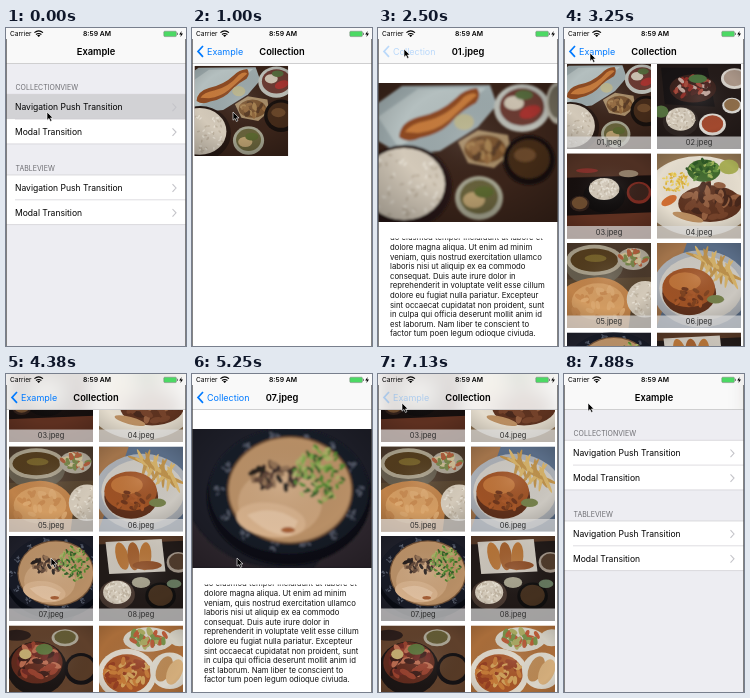
Write an HTML page that moves like this. It is 180 by 318 pixels and loops after 8 s.

```html
<!DOCTYPE html>
<html lang="en">
<head>
<meta charset="utf-8">
<title>Photo transition demo</title>
<style>
  html, body { margin: 0; width: 100%; height: 100%; overflow: hidden; background: #fff; }
  svg { display: block; }
  #stage { width: 100vw; height: 100vh; }
  text { font-family: Inter, Roboto, "Liberation Sans", sans-serif; }
  .title { font-size: 9.3px; font-weight: 600; text-anchor: middle; }
  .back { font-size: 9px; fill: #007aff; }
  .row { font-size: 8.55px; }
  .head { font-size: 7px; fill: #6d6d72; }
  .label { font-size: 7.4px; text-anchor: middle; fill: #2c2c2c; }
  .body { font-size: 7.75px; fill: #111; }
</style>
</head>
<body>
<svg id="stage" viewBox="0 0 180 318">
  <defs id="defs">
    <clipPath id="textClip"><rect y="210.5" width="180" height="108"/></clipPath>
    <clipPath id="barClip"><rect width="180" height="36"/></clipPath>
    <filter id="soft"><feGaussianBlur stdDeviation=".9"/></filter>
    <filter id="frost"><feGaussianBlur stdDeviation="9"/></filter>
    <radialGradient id="light" cx=".5" cy=".4" r=".75">
      <stop offset="0" stop-color="#fff" stop-opacity=".1"/>
      <stop offset=".5" stop-color="#000" stop-opacity="0"/>
      <stop offset="1" stop-color="#000" stop-opacity=".28"/>
    </radialGradient>
  </defs>
  <rect width="180" height="318" fill="#fff"/>
  <g id="list"></g>
  <g id="collection"><rect width="180" height="318" fill="#fff"/><g id="grid"></g></g>
  <use id="hero"/>
  <g id="article" clip-path="url(#textClip)"></g>
  <g id="nav">
    <g clip-path="url(#barClip)">
      <rect width="180" height="36" fill="#fff"/>
      <g id="frosted"><use href="#grid" filter="url(#frost)"/></g>
    </g>
    <rect width="180" height="36" fill="#f8f8f8" opacity=".85"/>
    <rect y="35.4" width="180" height=".6" fill="#b4b4b6"/>
    <text x="4" y="8.2" font-size="6.6">Carrier</text>
    <g fill="none" stroke="#000" stroke-width="1.1">
      <path d="M28.4 4.6Q32.7 1.2 37 4.6M30 6.5Q32.7 4.4 35.4 6.5"/>
    </g>
    <path d="M31.1 7.4Q32.7 6.3 34.3 7.4L32.7 9Z"/>
    <text x="91" y="8.2" font-size="6.8" font-weight="600" text-anchor="middle">8:59 AM</text>
    <rect x="157.8" y="3.2" width="12.6" height="5.4" rx="1" fill="#4cd964" stroke="#7a7a7a" stroke-width=".5"/>
    <rect x="171" y="4.8" width=".9" height="2.2" fill="#777"/>
    <path d="M175.6 3L173.2 6.4H174.9L174.5 9L177 5.4H175.2Z"/>
    <path id="chevron" d="M11 18L6 23.4L11 28.8" fill="none" stroke="#007aff" stroke-width="1.7"/>
    <g id="items"></g>
  </g>
  <path id="cursor" d="M0 0V8.2L2 6.5L3.4 9.5L4.9 8.8L3.5 5.9H6Z" stroke="#fff" stroke-width=".6"/>
  <path d="M.4 11V318M179.6 11V318" stroke="#555" stroke-width=".8"/>
</svg>
<script>
const LOOP = 8000, CELL_W = 84, CELL_H = 85, PITCH = 89.5, SCROLL = 142.5;
const $ = id => document.getElementById(id);

// Drawing helpers for the dishes
let seed = 7;
const random = () => (seed = seed * 16807 % 2147483647) / 2147483647;
const oval = (x, y, rx, ry, fill, turn = 0) =>
  `<ellipse cx="${x}" cy="${y}" rx="${rx}" ry="${ry}" fill="${fill}" transform="rotate(${turn} ${x} ${y})"/>`;
const shape = (d, fill) => `<path d="${d}" fill="${fill}"/>`;
const bowl = (x, y, rx, ry, rim, food) => oval(x, y, rx, ry, rim) + oval(x, y - 1, rx * .8, ry * .78, food);
const scatter = (n, x, y, rx, ry, size, colors) => {
  let out = '';
  for (let i = 0; i < n; i++) {
    const a = random() * 6.283, r = Math.sqrt(random());
    out += oval((x + Math.cos(a) * r * rx).toFixed(1), (y + Math.sin(a) * r * ry).toFixed(1),
      size, size * .5, colors[i % colors.length], Math.round(random() * 180));
  }
  return out;
};
const rice = (x, y, rx, ry) => oval(x, y, rx, ry, '#d3c9b9') + scatter(60, x, y, rx * .95, ry * .92, 2.5, ['#e6dfd2', '#bfb3a1']);

const dishes = [
  ['#3a241a',
    shape('M0 20L24 3L112 2L119 22L100 44L62 68L24 72L0 58Z', '#9ba8aa'),
    shape('M0 34L40 6L108 5L70 38L20 64Z', '#b4bfbf'),
    shape('M21 54Q22 39 40 34Q62 30 78 15Q86 6 99 5Q104 12 98 20Q86 26 76 36Q64 51 42 55Q30 61 21 54Z', '#8d4a22'),
    shape('M27 49Q32 41 48 38Q70 33 86 14Q95 8 99 12Q86 23 71 37Q58 48 40 50Z', '#c67a3b'),
    oval(86, 39, 10, 8, '#b9b48c'), bowl(144, 25, 28, 24, '#b9bbb4', '#6a3a32'),
    oval(136, 20, 10, 7, '#c9bfae'), oval(152, 29, 11, 6, '#a3332f', -20), oval(146, 12, 9, 5, '#566b3d'),
    bowl(180, 20, 12, 21, '#b5b1a3', '#6f6a5a'),
    shape('M80 59L100 47L130 52L133 70L116 85L90 80Z', '#a68b66'), oval(107, 66, 21, 14, '#76502c'),
    scatter(22, 107, 66, 18, 11, 5, ['#91663a', '#a37d4b', '#553720']),
    oval(27, 104, 47, 42, '#261813'), rice(26, 101, 41, 36),
    bowl(151, 77, 26, 25, '#17100d', '#432a19'), oval(147, 72, 11, 7, '#684629'),
    bowl(101, 115, 24, 22, '#a2a18d', '#66613a'), oval(96, 117, 11, 8, '#b69c6d'), oval(106, 109, 10, 6, '#59652f')],
  ['#241b19',
    oval(62, 24, 30, 16, '#453a33'), shape('M28 6H104L116 70L34 66Z', '#171314'), oval(80, 40, 38, 23, '#3a211c'),
    scatter(36, 80, 38, 31, 17, 6, ['#8e2b24', '#a4493a', '#4b2420', '#c0a49a']), oval(88, 24, 15, 7, '#4a713d'),
    bowl(148, 24, 22, 17, '#d6d1ca', '#a99587'), bowl(144, 68, 16, 13, '#d5d3ce', '#8d6d49'),
    oval(60, 94, 29, 24, '#302724'), rice(60, 90, 24, 19), bowl(112, 99, 22, 18, '#ddd9d2', '#a2492e'), oval(28, 78, 12, 10, '#54703e')],
  ['#38201a',
    shape('M0 0H180V34L0 40Z', '#4f3023'), shape('M18 40L160 36L170 104L12 110Z', '#160f0e'),
    shape('M16 102L164 96L170 139H8Z', '#5e3020'), oval(82, 70, 34, 27, '#0f0c0c'), rice(82, 58, 25, 18),
    bowl(139, 64, 20, 18, '#7a2a20', '#38211a'), bowl(42, 82, 16, 13, '#30201a', '#6b4b2e'),
    oval(122, 33, 16, 6, '#93806a'), oval(54, 28, 18, 4, '#84302a')],
  ['#8f7352',
    oval(91, 70, 91, 66, '#e4dccd'), oval(108, 82, 52, 30, '#5d321f'),
    scatter(34, 111, 76, 45, 28, 10, ['#74422a', '#47271b', '#945f40']), oval(98, 28, 27, 18, '#3f682b'),
    scatter(26, 98, 27, 26, 17, 5, ['#64913f', '#2d5725', '#a0b45c']), scatter(55, 52, 47, 22, 17, 3, ['#dcb13b', '#ecd063']),
    oval(41, 77, 14, 7, '#cf6d31', -30), oval(139, 22, 16, 12, '#a8ad55'), oval(72, 104, 26, 6, '#b98d60', 15)],
  ['#57442f',
    shape('M0 0H180V55L0 60Z', '#49382a'), oval(66, 38, 47, 31, '#635b4c'), oval(66, 28, 46, 25, '#a69d88'), oval(66, 28, 39, 19, '#513b1d'),
    oval(68, 25, 18, 6, '#75612a'), oval(130, 26, 26, 18, '#a9a294'), scatter(30, 130, 24, 21, 13, 6, ['#76854a', '#a95a3a', '#c9b992']),
    shape('M8 139V84Q28 58 72 56Q112 58 128 91L122 139Z', '#bf8249'), oval(72, 96, 43, 30, '#d39c62'),
    scatter(24, 74, 102, 45, 28, 7, ['#c78a51', '#daa76f']), rice(149, 92, 30, 30)],
  ['#596c86',
    shape('M0 0H70L20 139H0Z', '#a2744b'), oval(93, 75, 79, 63, '#a9adb3'), oval(93, 74, 68, 53, '#cbc7c0'),
    Array.from({ length: 16 }, (_, i) => oval(91 + i * 3.5, 24 + i * 37 % 35, 24, 3, i % 2 ? '#d4b169' : '#bd914b', 20 + i * 43 % 120)).join(''),
    oval(74, 82, 44, 36, '#5e301b'), oval(73, 73, 43, 32, '#9e5225'), oval(67, 63, 26, 15, '#bd7238'),
    scatter(18, 76, 88, 34, 16, 6, ['#6c351c', '#a65729', '#7e421f']), oval(117, 92, 14, 7, '#75804b')],
  ['#1e1f29',
    shape('M0 91Q30 140 92 139H0ZM174 72L180 70V139H122Z', '#302a30'), oval(97, 68, 82, 68, '#090c14'), oval(97, 62, 80, 63, '#171a25'),
    Array.from({ length: 14 }, (_, i) => {
      const a = i * .449;
      return scatter(7, 97 + 70 * Math.cos(a), 62 + 55 * Math.sin(a), 5, 5, 2.2, ['#565c6a', '#424857']);
    }).join(''),
    oval(98, 61, 63, 54, '#705036'), oval(98, 61, 61, 52, '#b88f66'), oval(88, 74, 42, 34, '#c8a17a'),
    oval(79, 91, 35, 17, '#d4af8a', 8), shape('M55 86Q81 74 106 92L99 106Q77 108 55 86Z', '#dfbf9f'), oval(96, 101, 7, 3, '#a45e36'),
    scatter(40, 84, 47, 24, 13, 5, ['#221a18', '#5b4030', '#362620', '#8f6d50']),
    scatter(110, 127, 46, 25, 29, 3, ['#4f852e', '#7ea64b', '#316026', '#a6b065'])],
  ['#553826',
    shape('M18 14L180 7V139H10Z', '#211a18'), shape('M32 10L124 5L130 58L38 62Z', '#c9c3b9'),
    [0, 1, 2].map(i => oval(59 + i * 19, 33, 10, 23, i % 2 ? '#9f5e2e' : '#b37338', -15 + i * 9)).join(''),
    oval(100, 48, 24, 7, '#8b4c25'), bowl(151, 43, 19, 17, '#9d9185', '#4e3a2b'), oval(51, 96, 29, 24, '#4a3a32'), rice(51, 92, 23, 19),
    bowl(122, 98, 25, 22, '#100f0f', '#44301f'), oval(90, 76, 15, 9, '#a5a18c'), oval(144, 78, 12, 7, '#64765d')],
  ['#5f402b',
    oval(67, 70, 49, 44, '#1b1514'), oval(67, 61, 42, 34, '#5f2a1d'),
    scatter(38, 66, 59, 35, 27, 9, ['#96402d', '#b86a4e', '#6d2923', '#3d1d18']), oval(79, 39, 14, 9, '#5a7239'), oval(48, 47, 10, 8, '#c3ac70'),
    bowl(139, 71, 27, 26, '#151214', '#563a26'), bowl(113, 20, 22, 14, '#aaa494', '#625a34'), oval(34, 16, 23, 9, '#2a1d1a')],
  ['#a96d3a',
    oval(102, 23, 41, 20, '#d2cec2'), scatter(36, 101, 21, 31, 13, 7, ['#76904a', '#a8a862', '#b75a38']),
    oval(67, 80, 48, 42, '#dcd5c8'), oval(67, 79, 39, 32, '#a65528'),
    scatter(44, 67, 78, 34, 27, 7, ['#c47a38', '#933e22', '#cfa05a']), oval(137, 74, 32, 30, '#dad5c9'),
    oval(128, 71, 12, 22, '#b98854', 24), oval(145, 76, 12, 22, '#d3ad7b', 24), oval(153, 20, 18, 14, '#d0ccc0')]
];
const dishName = i => `${String(i + 1).padStart(2, '0')}.jpeg`;
const cellAt = i => ({ x: 3 + i % 2 * 90, y: 36 + (i >> 1) * PITCH });

$('defs').innerHTML += dishes.map(([ground, ...parts], i) =>
  `<symbol id="dish${i}" viewBox="0 0 180 139" preserveAspectRatio="xMidYMid slice">
    <rect width="180" height="139" fill="${ground}"/><g filter="url(#soft)">${parts.join('')}</g>
    <rect width="180" height="139" fill="url(#light)"/></symbol>`).join('');

$('grid').innerHTML = dishes.map((_, i) => {
  const { x, y } = cellAt(i);
  return `<use href="#dish${i}" x="${x}" y="${y}" width="${CELL_W}" height="${CELL_H}"/>
    <rect x="${x}" y="${y + 72.5}" width="${CELL_W}" height="12.5" fill="#dcdcdc" opacity=".7"/>
    <text class="label" x="${x + CELL_W / 2}" y="${y + 81.4}">${dishName(i)}</text>`;
}).join('');

const section = (name, y) => `<text class="head" x="9.5" y="${y - 4.5}">${name}</text>
  <rect y="${y}" width="180" height="49.6" fill="#fff"/>` +
  ['Navigation Push Transition', 'Modal Transition'].map((label, i) => {
    const top = y + i * 24.8;
    return `${name[0] === 'C' && !i ? `<rect id="pressed" y="${top}" width="180" height="24.8" fill="#d2d2d5"/>` : ''}
      <text class="row" x="9" y="${top + 15.8}">${label}</text>
      <path d="M166.5 ${top + 9.2}L170 ${top + 13}L166.5 ${top + 16.8}" fill="none" stroke="#c4c4c9" stroke-width="1.1"/>`;
  }).join('') +
  `<path d="M0 ${y}H180M9 ${y + 24.8}H180M0 ${y + 49.6}H180" stroke="#c8c7cc" stroke-width=".6"/>`;
$('list').innerHTML = '<rect width="180" height="318" fill="#ededf2"/>' + section('COLLECTIONVIEW', 66.3) + section('TABLEVIEW', 147);

$('article').innerHTML = [
  'do eiusmod tempor incididunt ut labore et', 'dolore magna aliqua. Ut enim ad minim',
  'veniam, quis nostrud exercitation ullamco', 'laboris nisi ut aliquip ex ea commodo',
  'consequat. Duis aute irure dolor in', 'reprehenderit in voluptate velit esse cillum',
  'dolore eu fugiat nulla pariatur. Excepteur', 'sint occaecat cupidatat non proident, sunt',
  'in culpa qui officia deserunt mollit anim id', 'est laborum. Nam liber te conscient to',
  'factor tum poen legum odioque civiuda.'
].map((line, i) => `<text class="body" x="12" y="${212.3 + i * 9.6}">${line}</text>`).join('');

$('items').innerHTML = ['Example', 'Collection', ''].map((name, i, all) =>
  `<text class="title" id="title${i}" y="26.6">${name}</text>
   <text class="back" id="back${i}" y="26.6">${all[i - 1] || ''}</text>`).join('');

// Timing
const clamp = v => Math.min(1, Math.max(0, v));
const ramp = (t, a, b) => (1 - Math.cos(Math.PI * clamp((t - a) / (b - a)))) / 2;
const mix = (a, b, p) => a + (b - a) * p;
const within = (t, a, b) => t >= a && t < b;
const set = (el, attrs) => { for (const k in attrs) el.setAttribute(k, attrs[k]); };

const path = [[0, 41, 84], [1450, 41, 84], [2250, 26, 21], [2700, 26, 21], [3000, 26, 25], [3300, 26, 25],
  [3650, 45, 184], [5350, 45, 184], [6100, 41, 23], [6700, 41, 23], [7000, 24, 29], [LOOP, 24, 29]];
function pointer(t) {
  const i = path.findIndex(k => k[0] > t), [a, x, y] = path[i - 1], [b, x2, y2] = path[i];
  const p = ramp(t, a, b);
  return `translate(${mix(x, x2, p)} ${mix(y, y2, p)})`;
}

// The bar starts its own transition slightly after the photo starts to grow
const detail = (t, lag) => t < 4000
  ? ramp(t, 900 + lag, 1400) - ramp(t, 2560, 3060)
  : ramp(t, 4750 + lag, 5250) - ramp(t, 6360, 6860);

function draw(t) {
  const slide = ramp(t, 130, 630) - ramp(t, 7130, 7630);
  const zoom = detail(t, 0);
  const scroll = SCROLL * ramp(t, 3450, 4350);
  const chosen = t < 4000 ? 0 : 6;
  const sideways = `translate(${180 * (1 - slide)} 0)`;

  set($('list'), { transform: `translate(${-54 * slide} 0)` });
  set($('pressed'), { opacity: t < 7000 ? 1 : slide });
  set($('collection'), { transform: sideways });
  set($('frosted'), { transform: sideways, visibility: scroll ? 'visible' : 'hidden' });
  set($('grid'), { transform: `translate(0 ${-scroll})`, opacity: clamp(1 - zoom * 15) });

  const from = cellAt(chosen);
  set($('hero'), {
    href: `#dish${chosen}`, visibility: zoom > 0 ? 'visible' : 'hidden',
    x: mix(from.x, 0, zoom), y: mix(from.y - scroll, 55, zoom),
    width: mix(CELL_W, 180, zoom), height: mix(CELL_H, 139, zoom)
  });
  set($('article'), { visibility: zoom === 1 ? 'visible' : 'hidden' });

  const level = slide + detail(t, 100);
  const dim = within(t, 2450, 3060) || within(t, 6290, 6860) || within(t, 7060, 7630) ? .25 : 1;
  $('title2').textContent = dishName(chosen);
  for (let i = 0; i < 3; i++) {
    const shift = i - level, alpha = clamp(1 - Math.abs(shift) * 1.5);
    set($('title' + i), { x: 90 + shift * 60, opacity: alpha });
    set($('back' + i), { x: 15 + shift * 50, opacity: alpha * dim });
  }
  set($('chevron'), { opacity: Math.min(1, level) * dim });
  set($('cursor'), { transform: pointer(t) });
}

const start = performance.now();
function tick() {
  draw((performance.now() - start) % LOOP);
  requestAnimationFrame(tick);
}
tick();
</script>
</body>
</html>
```
